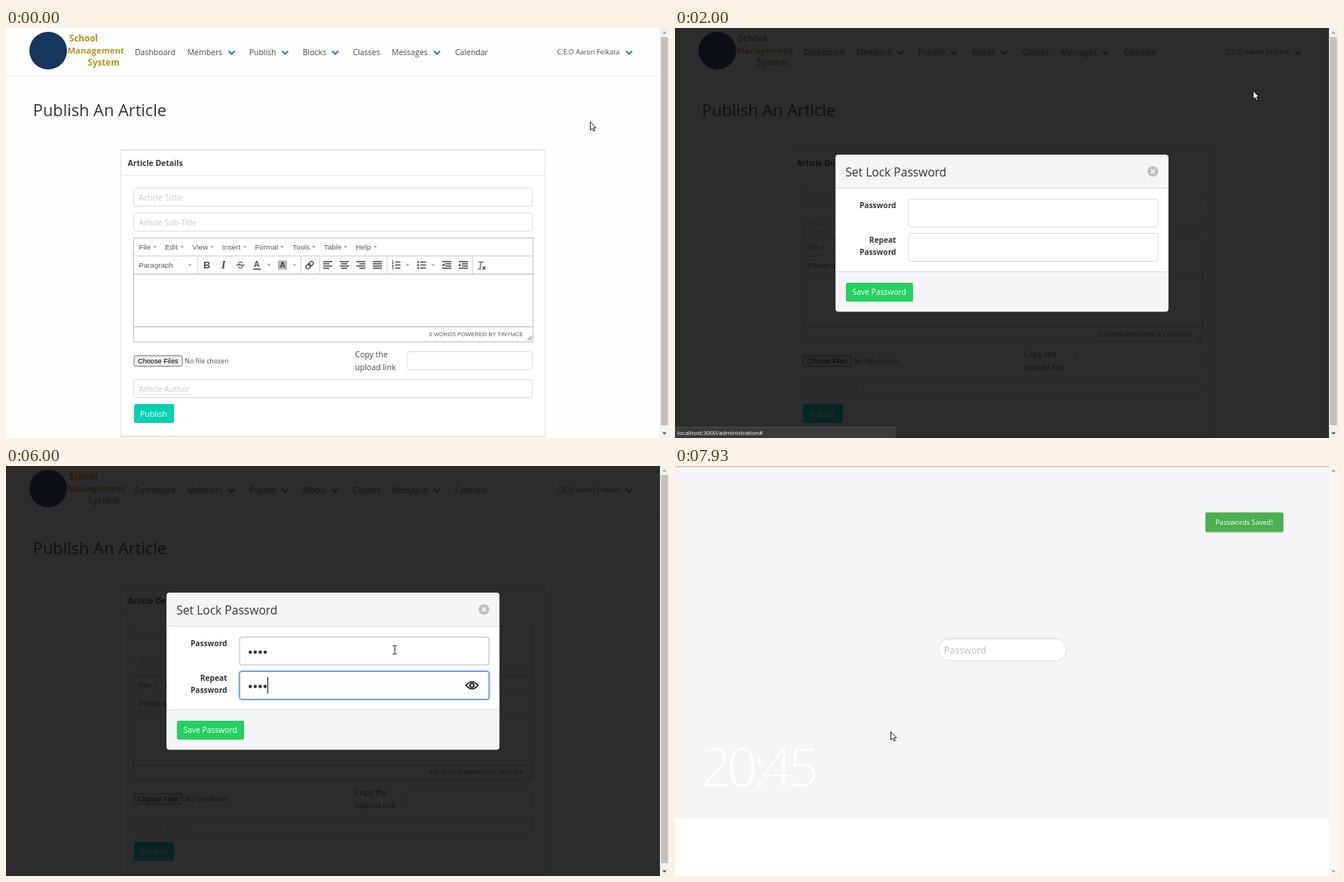
An HTML page for the animation above (8 s loop, 880 by 544 pixels).

```html
<!DOCTYPE html>
<html lang="en">
<head>
<meta charset="utf-8">
<title>Publish an article</title>
<style>
html, body { margin: 0; width: 100%; height: 100%; overflow: hidden; background: #fefefe; }
svg { display: block; width: 880px; height: 544px; }
text { font-family: 'Open Sans', 'Noto Sans', sans-serif; white-space: pre; }
.ui { font-family: 'Liberation Sans', Arial, sans-serif; }
.serif { font-family: 'Liberation Serif', serif; }
.b { font-weight: 700; }
.m { font-weight: 500; }
.l { font-weight: 300; letter-spacing: -5px; }
.i { font-style: italic; }
.end { text-anchor: end; }
</style>
</head>
<body>
<svg id="stage" viewBox="0 0 880 544" xmlns="http://www.w3.org/2000/svg"></svg>
<script>
const LOOP = 8000;
const BLUE = '#3273dc', BORDER = '#dbdbdb', INK = '#4a4a4a', DARK = '#363636';

const text = (x, y, s, size, fill = INK, cls = '') =>
  `<text x="${x}" y="${y}" font-size="${size}" fill="${fill}" class="${cls}">${s}</text>`;
const box = (x, y, w, h, fill = 'none', stroke = 'none', r = 0, more = '') =>
  `<rect x="${x}" y="${y}" width="${w}" height="${h}" rx="${r}" fill="${fill}" stroke="${stroke}" ${more}/>`;
const path = (d, stroke = INK, width = 1, fill = 'none', more = '') =>
  `<path d="${d}" stroke="${stroke}" stroke-width="${width}" fill="${fill}" ${more}/>`;
const hline = (x1, x2, y, color) => path(`M${x1} ${y}H${x2}`, color);
const group = (id, body) => `<g id="${id}">${body}</g>`;
const input = (x, y, w, h, id = '') => box(x, y, w, h, '#fff', BORDER, 3, id && `id="${id}"`);
const chevron = x => path(`M${x - 4} 30.5l4 4l4 -4`, BLUE, 2);
const tri = (x, y) => path(`M${x - 2.7} ${y - 1.3}h5.4l-2.7 2.8z`, 'none', 0, '#aaa');

function header() {
  const nav = [['Dashboard', 171], ['Members', 240.7, 299.5], ['Publish', 322.7, 370.5],
    ['Blocks', 393.8, 437], ['Classes', 460.6], ['Messages', 512, 572], ['Calendar', 596]];
  return '<circle cx="56" cy="30" r="25" fill="#16365c"/>' +
    text(84, 18, 'School', 11.6, '#b8921f', 'b') +
    text(81.5, 34, 'Management', 11.4, '#b8921f', 'b') +
    text(108.5, 49.5, 'System', 11.6, '#b8921f', 'b') +
    nav.map(([s, x, arrow]) => text(x, 36, s, 10.45) + (arrow ? chevron(arrow) : '')).join('') +
    text(731.5, 35.3, 'C.E.O Aaron Felkata', 9.15) + chevron(827) +
    hline(0, 868, 63.5, '#eeeeee');
}

// Rows of bars: each bar is [offset, length]
const bars = (x, rows) => rows.map(([dx, w], i) =>
  path(`M${x + dx} ${310 + i * 2.9}h${w}`, INK, 1.5)).join('');

function editor() {
  const menu = [['File', 176.4, 197.5], ['Edit', 211, 233.5], ['View', 247.3, 273.5], ['Insert', 286.8, 317],
    ['Format', 330.4, 366.5], ['Tools', 380.3, 408.5], ['Table', 422, 450.5], ['Help', 464.3, 490]];
  const full = [0, 12], list = [4, 8];
  return box(169.5, 278.5, 530, 138, '#fff', '#c0c0c0') +
    hline(170, 699, 302.5, '#cfcfcf') + hline(170, 699, 326.5, '#b8b8b8') + hline(170, 699, 396.5, '#b8b8b8') +
    menu.map(([s, x, a]) => text(x, 294, s, 9.8, '#595959', 'ui') + tri(a, 290.5)).join('') +
    text(176.2, 318, 'Paragraph', 9.75, '#595959', 'ui') +
    [244, 349, 383, 533, 567].map(x => tri(x, 314.5)).join('') +
    [254.5, 391.5, 416.5, 505.5, 619.5].map(x => path(`M${x} 303V326`, '#d5d5d5')).join('') +
    text(262, 318.8, 'B', 12.5, INK, 'ui b') +
    text(286, 319, 'I', 14, INK, 'serif b i') +
    text(307.3, 318.8, 'S', 12, INK, 'ui') + hline(305.5, 317, 314.5, INK) +
    text(329, 317.3, 'A', 10.5, INK, 'ui b') + path('M328 320H338.5', INK, 1.5) +
    box(361, 308.5, 12, 12, '#b5b5b5') + text(363.3, 318.3, 'A', 10.5, INK, 'ui b') +
    `<g transform="rotate(-45 403 314.5)">` + box(397, 312, 7, 5, 'none', INK, 2.5, 'stroke-width="1.3"') +
    box(402, 312, 7, 5, 'none', INK, 2.5, 'stroke-width="1.3"') + '</g>' +
    bars(421, [full, [0, 8], full, [0, 8]]) + bars(443, [full, [2, 8], full, [2, 8]]) +
    bars(465, [full, [4, 8], full, [4, 8]]) + bars(487, [full, full, full, full]) +
    [0, 1, 2].map(i => {
      const y = 310.5 + i * 4;
      return path(`M516.5 ${y}h7M550 ${y}h7.5`, INK, 1.5) +
        text(512, y + 1.8, i + 1, 4.8, INK, 'ui b') +
        `<circle cx="547" cy="${y}" r="1.3" fill="${INK}"/>`;
    }).join('') +
    bars(579, [full, list, list, full]) + path('M582 312.3v4.4l-3 -2.2z', 'none', 0, INK) +
    bars(601, [full, list, list, full]) + path('M601 312.3v4.4l3 -2.2z', 'none', 0, INK) +
    text(626, 318.8, 'T', 12, INK, 'ui i') + path('M626 320h5M632.5 316.5l4 4m0 -4l-4 4', INK, 1.2) +
    text(561.5, 408.8, '0 WORDS POWERED BY TINYMCE', 7.6, '#595959', 'ui') +
    path('M698 407v7h-7z', 'none', 0, '#c4c4c4');
}

function page() {
  return box(0, 0, 880, 544, '#fefefe') + header() +
    text(35.8, 117.3, 'Publish An Article', 21.8, DARK, 'm') +
    box(152.5, 161.5, 563, 380, '#fff', '#e2e2e2') + hline(153, 715, 162.5, '#f0f0f0') +
    hline(152, 716, 542.5, '#e4e4e4') + hline(153, 715, 195.5, '#e8e8e8') +
    text(161.5, 182.8, 'Article Details', 10.4, DARK, 'b') +
    input(169.5, 212.5, 529, 24) + text(176.5, 229, 'Article Tittle', 10.6, '#c9c9c9') +
    input(169.5, 245.5, 529, 24) + text(176.5, 262, 'Article Sub-Title', 10.6, '#c9c9c9') +
    editor() +
    box(170, 434.8, 64, 14, '#efefef', '#767676', 2) +
    text(175, 445, 'Choose Files', 9.2, '#000', 'ui') + text(237.3, 445, 'No file chosen', 8.8) +
    text(463.3, 437.3, 'Copy the', 10.5) + text(463.3, 453.6, 'upload link', 10.5) +
    input(532.5, 429.5, 166, 24) +
    input(169.5, 466.5, 529, 24) + text(176.5, 483.3, 'Article Author', 10.5, '#c9c9c9') +
    box(170, 499, 53, 25, '#00d1b2', 'none', 2) + text(178, 515.6, 'Publish', 10.5, '#fff');
}

const scrollbar = box(868, 0, 12, 544, '#f1f1f1') + box(869.3, 12, 9.4, 515, '#c1c1c1') +
  path('M871 7.5h6l-3 -3z', 'none', 0, '#a3a3a3') + path('M871 536.5h6l-3 3z', 'none', 0, '#505050');

const dropdown = box(723, 0, 123, 63, '#0a0a0a', 'none', 0, 'opacity=".03"') +
  [10, 8, 6, 4, 2].map(d => box(723 - d / 3, 67, 120 + d / 1.5, 54 + d, '#0a0a0a', 'none', 3, 'opacity=".018"')).join('') +
  box(723, 63, 120, 58, '#fff', 'none', 3) + box(723, 62.6, 120, 1.6, '#cfcfcf') +
  box(723, 70, 120, 22.5, '#f5f5f5', 'none', 0, 'id="lockRow"') +
  text(734.3, 84.7, 'LOCK', 9.1) + text(734.3, 107.7, 'Logout', 9.2);

const field = n => {
  const y = n ? 272.5 : 227;
  return box(309, y - 1, 333, 39, 'none', BLUE, 4, `id="ring${n}" stroke-width="2.5" stroke-opacity=".25"`) +
    input(310, y, 331, 37, 'field' + n) +
    [0, 1, 2, 3].map(i => `<circle id="dot${n}${i}" cx="${324.2 + i * 6.6}" cy="${y + 20}" r="2.2" fill="#363636"/>`).join('') +
    group('eye' + n, path(`M610.5 ${y + 18.5}q8 -9.5 16 0q-8 9.5 -16 0z`, '#111', 1.5) +
      `<circle cx="618.5" cy="${y + 18.5}" r="2.6" fill="none" stroke="#111" stroke-width="1.7"/>`) +
    box(0, y + 7.5, 1, 22, '#111', 'none', 0, `id="caret${n}"`);
};

const modal = box(0, 0, 868, 544, '#0a0a0a', 'none', 0, 'opacity=".86"') +
  box(213, 168, 442, 208.5, '#f5f5f7', 'none', 4) + box(213, 212, 442, 112, '#fff') +
  hline(213, 655, 212.5, BORDER) + hline(213, 655, 323.5, BORDER) +
  text(226.3, 197, 'Set Lock Password', 15.6, DARK) +
  '<circle cx="634.3" cy="190.3" r="7" fill="#c0c0c0"/>' + path('M631.8 187.8l5 5m0 -5l-5 5', '#fff', 1.6) +
  text(293.5, 239.3, 'Password', 10.2, DARK, 'b end') +
  text(293.5, 285, 'Repeat', 10.2, DARK, 'b end') + text(293.5, 301, 'Password', 10.2, DARK, 'b end') +
  field(0) + field(1) +
  box(226, 337, 91, 27, 'none', '#23d160', 3, 'id="saveRing" stroke-width="2" stroke-opacity=".35"') +
  box(227, 338, 89, 25, '#23d160', 'none', 2, 'id="save"') +
  text(235.3, 354.4, 'Save Password', 10.35, '#fff');

const status = box(0, 529.5, 292, 15, '#3b3b3e', '#4a4a4d', 1) +
  text(3, 539.8, 'localhost:3000/administration#', 7.8, '#fff');

const lock = box(0, 0, 880, 544, '#fff') + box(0, 0, 868, 468, '#f5f5f7') + box(0, 0, 868, 1.6, '#cbc8c3') +
  box(868, 0, 12, 544, '#f7f7f7') +
  path('M871 7.5h6l-3 -3z', 'none', 0, '#a3a3a3') + path('M871 536.5h6l-3 3z', 'none', 0, '#a3a3a3') +
  box(349.5, 228.5, 170, 30, '#fff', '#dedede', 15) + path('M357 230.6Q361 229.8 366 229.8H503Q508 229.8 512 230.6', '#e9e9e9') +
  text(357, 249.2, 'Password', 12.5, '#bdbdbd') +
  text(34, 425, '20:45', 70, '#fff', 'l') +
  group('toast', box(704, 63, 104, 26, '#000', 'none', 2, 'opacity=".12"') +
    box(704, 61.5, 103.5, 26, '#4caf50', 'none', 2) + text(717.3, 78.3, 'Passwords Saved!', 9.2, '#fff'));

const pointer = group('arrow', path('M.5 .5V11.5L3 9.2L4.8 13L6.6 12.2L4.9 8.5H8z', '#111', 0.9, '#fff')) +
  group('beam', path('M-2.5 -5.5h2l.5 .5l.5 -.5h2M0 -5V5M-2.5 5.5h2l.5 -.5l.5 .5h2', '#222', 1));

document.getElementById('stage').innerHTML = page() + group('dropdown', dropdown) + group('modal', modal) +
  scrollbar + group('status', status) + group('lock', lock) + group('pointer', pointer);

const el = {};
document.querySelectorAll('[id]').forEach(node => { el[node.id] = node; });
const show = (id, on) => { el[id].style.display = on ? '' : 'none'; };
const within = (t, a, b) => t >= a && t < b;

// Pointer stops: time, x, y
const stops = [[530, 775, 124], [1070, 820.5, 28], [1230, 820.5, 28], [1530, 767, 83], [2050, 767, 83],
  [2700, 516, 244], [6400, 516, 244], [6600, 440, 296], [6770, 440, 296], [7070, 286, 352]];
const keys = [[3530, 3670, 3970, 4130], [5500, 5570, 5800, 6000]];
const focus = [[2730, 4670], [4670, 7230]];
const blinkOff = [[[3270, 3530]], [[5200, 5500], [6530, 7070]]];

function pointerAt(t) {
  const next = stops.findIndex(s => s[0] > t);
  if (next === 0) return stops[0].slice(1);
  if (next < 0) return stops[stops.length - 1].slice(1);
  const [t0, x0, y0] = stops[next - 1], [t1, x1, y1] = stops[next];
  const k = (t - t0) / (t1 - t0), e = k * k * (3 - 2 * k);
  return [x0 + (x1 - x0) * e, y0 + (y1 - y0) * e];
}

function draw(t) {
  const [x, y] = pointerAt(t);
  const open = within(t, 2000, 7670), locked = t >= 7670;
  const over = (x0, y0, x1, y1) => open && x >= x0 && x <= x1 && y >= y0 && y <= y1;
  const hover = [over(310, 227, 641, 264), over(310, 272, 641, 310)];

  show('dropdown', t < 2000 && t > 530 && (y < 63 || t > 1070));
  show('lockRow', t > 1230 && y > 70);
  show('status', within(t, 1470, 2200));
  show('modal', open);
  show('lock', locked);
  el.toast.setAttribute('opacity', Math.max(0, Math.min(1, (t - 7700) / 200)));

  for (const n of [0, 1]) {
    const typed = keys[n].filter(k => t >= k).length;
    const active = within(t, ...focus[n]);
    for (let i = 0; i < 4; i++) show(`dot${n}${i}`, i < typed);
    show('ring' + n, active);
    show('eye' + n, active && typed > 0);
    show('caret' + n, active && !blinkOff[n].some(b => within(t, ...b)));
    el['caret' + n].setAttribute('x', 320 + typed * 6.75);
    el['field' + n].setAttribute('stroke', active ? BLUE : hover[n] ? '#b5b5b5' : BORDER);
  }
  show('saveRing', t >= 7230);
  el.save.setAttribute('fill', over(227, 338, 316, 363) ? '#22c65b' : '#23d160');

  const inField = hover[0] || hover[1];
  show('arrow', !inField);
  show('beam', inField);
  el.pointer.setAttribute('transform', `translate(${x} ${y})`);
}

function tick() {
  draw(performance.now() % LOOP);
  requestAnimationFrame(tick);
}
tick();
</script>
</body>
</html>
```
